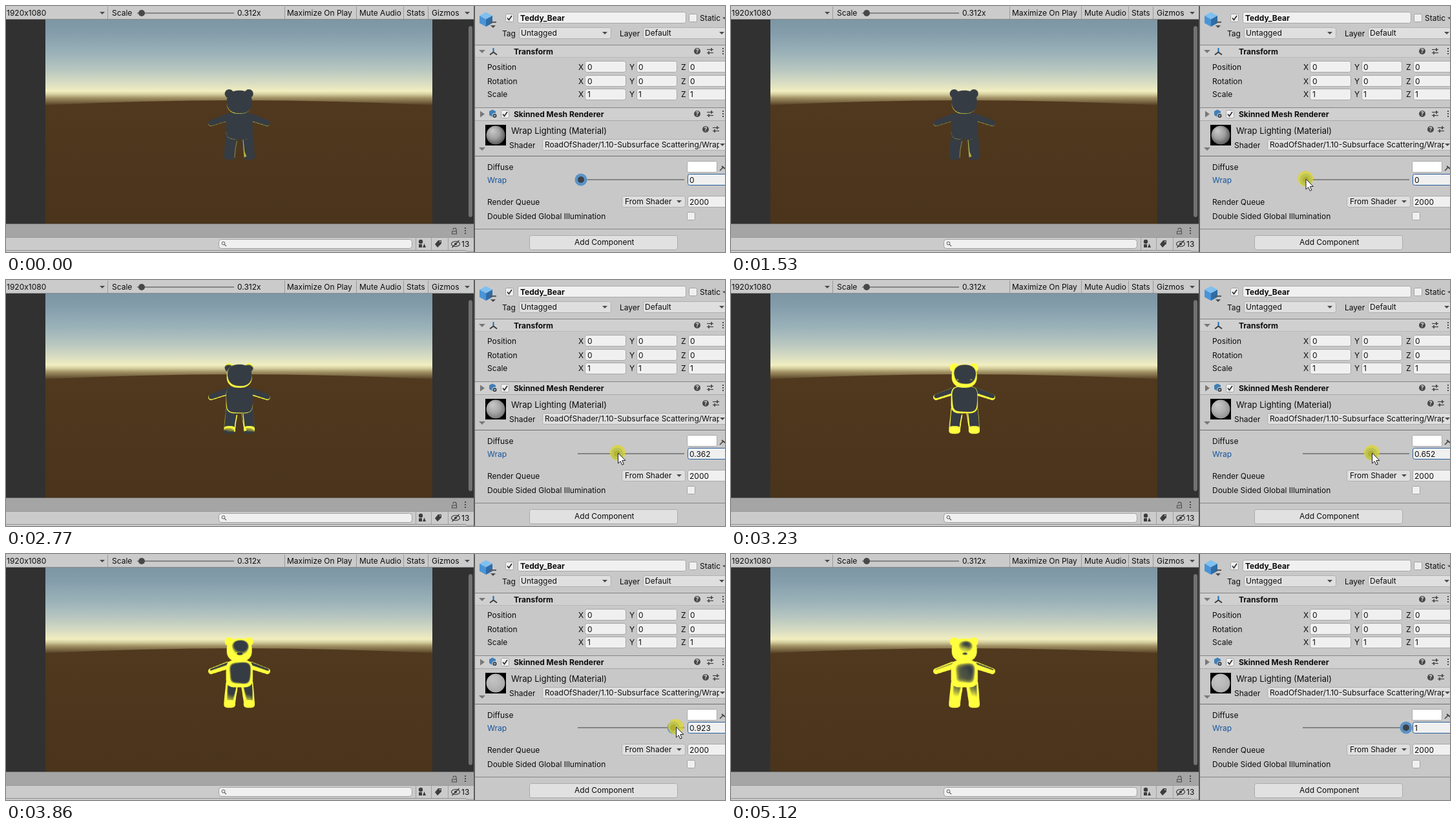
An HTML page with a canvas that plays this animation: 1113 by 381 pixels, repeating every 5.9 s.

```html
<!DOCTYPE html>
<html lang="en">
<head>
<meta charset="utf-8">
<title>Wrap Lighting</title>
<style>
html, body { margin: 0; width: 100%; height: 100%; overflow: hidden; background: #c8c8c8; }
#stage { position: relative; width: 1113px; height: 381px; overflow: hidden; }
canvas { position: absolute; left: 0; top: 0; }
span {
  position: absolute; font: 12px/16px Inter, Roboto, sans-serif; color: #0c0c0c;
  white-space: pre; overflow: hidden;
}
.bold { font-weight: 700; }
.big { font-size: 13px; }
.blue { color: #14549c; }
</style>
</head>
<body>
<div id="stage"><canvas id="back" width="1113" height="381"></canvas></div>
<script>
const LOOP = 5900, START = 430, STEP = 77.75;
const stage = document.getElementById('stage');
const back = document.getElementById('back').getContext('2d');
let g = back;

// ---------- drawing helpers ----------
function rect(x, y, w, h, color) {
  g.fillStyle = color;
  g.fillRect(x, y, w, h);
}
function box(x, y, w, h, fill, border, r = 3) {
  g.beginPath();
  g.roundRect(x + .5, y + .5, w - 1, h - 1, r);
  g.fillStyle = fill;
  g.fill();
  g.strokeStyle = border;
  g.lineWidth = 1;
  g.stroke();
}
function disc(x, y, r, color) {
  g.beginPath();
  g.arc(x, y, r, 0, 7);
  g.fillStyle = color;
  g.fill();
}
function shape(points, fill) {
  g.beginPath();
  points.forEach(([x, y]) => g.lineTo(x, y));
  g.closePath();
  g.fillStyle = fill;
  g.fill();
}
function line(points, color = '#404040', width = 1.2) {
  g.beginPath();
  points.forEach(([x, y]) => g.lineTo(x, y));
  g.strokeStyle = color;
  g.lineWidth = width;
  g.stroke();
}
const down = (x, y, s = 4, c = '#4a4a4a') => shape([[x - s, y - s / 2], [x + s, y - s / 2], [x, y + s / 2]], c);
const field = (x, y, w, h = 18) => box(x, y, w, h, '#f0f0f0', '#a8a8a8');
const dropdown = (x, y, w, arrow) => {
  box(x, y, w, 18, '#dfdfdf', '#b0b0b0');
  down(arrow, y + 9);
};
function check(x, y, on) {
  box(x, y, 13, 13, '#f0f0f0', '#a3a3a3', 2);
  if (on) line([[x + 3, y + 6.5], [x + 5.5, y + 9.5], [x + 10, y + 3]], '#303030', 1.7);
}
function label(text, x, y, cls = '', width) {
  const el = document.createElement('span');
  el.textContent = text;
  el.className = cls;
  el.style.left = x + 'px';
  el.style.top = y - 8 + 'px';
  if (width) el.style.width = width + 'px';
  stage.append(el);
  return el;
}
function dots(x, y) {
  for (const d of [-4, 0, 4]) rect(x - 1, y + d - 1, 2, 2, '#4a4a4a');
}
function tools(x, y, gap) {
  disc(x, y, 5, '#484848');
  g.fillStyle = '#e0e0e0';
  g.font = 'bold 9px Inter, sans-serif';
  g.textAlign = 'center';
  g.fillText('?', x, y + 3.3);
  const s = x + gap;
  line([[s - 5, y - 2.5], [s + 5, y - 2.5]]);
  line([[s - 5, y + 2.5], [s + 5, y + 2.5]]);
  line([[s + 2, y - 5], [s + 2, y]], '#404040', 1.6);
  line([[s - 2, y], [s - 2, y + 5]], '#404040', 1.6);
}

// ---------- static window ----------
function drawGameView() {
  rect(0, 0, 725, 21, '#cbcbcb');
  rect(0, 20, 725, 1, '#8c8c8c');
  rect(0, 21, 725, 316, '#313131');

  const sky = g.createLinearGradient(0, 21, 0, 153);
  [[0, '#7d96a4'], [.15, '#839dab'], [.4, '#9bb2b9'], [.6, '#bac8c0'], [.75, '#dadec2'],
   [.84, '#f2eec0'], [.875, '#d6cf9f'], [.92, '#a29265'], [1, '#5a4528']]
    .forEach(([p, c]) => sky.addColorStop(p, c));
  rect(61, 21, 599, 133, sky);

  const soil = g.createLinearGradient(0, 146, 0, 337);
  soil.addColorStop(0, '#51391f');
  soil.addColorStop(.3, '#4e371d');
  soil.addColorStop(1, '#4a341b');
  g.beginPath();
  g.moveTo(61, 153.5);
  g.quadraticCurveTo(361, 138.5, 660, 153.5);
  g.lineTo(660, 337);
  g.lineTo(61, 337);
  g.fillStyle = soil;
  g.fill();

  box(716, 31, 6, 296, '#717171', '#717171', 3);
  for (const x of [157, 431, 542, 615, 653]) rect(x, 1, 1, 19, '#9a9a9a');
  down(149, 11);
  down(714, 11);
  rect(203, 10, 150, 2, '#858585');
  disc(210, 11, 5, '#484848');
}

function drawBottomBar() {
  rect(0, 337, 725, 21, '#a5a5a5');
  rect(0, 337, 725, 1, '#6f6f6f');
  rect(0, 358, 725, 23, '#cbcbcb');
  rect(0, 358, 725, 1, '#999');
  rect(0, 378, 712, 1, '#8f8f8f');
  rect(712, 379, 13, 2, '#b4b4b4');
  box(329, 361, 300, 15, '#f0f0f0', '#a0a0a0', 4);
  g.beginPath();
  g.arc(336.5, 367.5, 2.4, 0, 7);
  g.strokeStyle = '#555';
  g.lineWidth = 1;
  g.stroke();
  line([[338.3, 369.3], [341, 372]], '#555', 1.1);
  for (const x of [634, 658, 684]) rect(x, 359, 1, 19, '#a0a0a0');

  // lock
  rect(690, 348.5, 8, 5, '#474747');
  rect(691, 349.5, 6, 3, '#a5a5a5');
  g.beginPath();
  g.arc(694.5, 346.5, 2.5, Math.PI, 0);
  g.lineTo(697, 348.5);
  g.strokeStyle = '#474747';
  g.lineWidth = 1.1;
  g.stroke();
  dots(711, 348);

  // filter icons
  disc(642, 365, 3.2, '#3c3c3c');
  rect(639, 369, 5, 5, '#3c3c3c');
  shape([[645, 374], [647.5, 368], [650, 374]], '#3c3c3c');
  shape([[664, 369], [669, 363], [674, 363], [674, 368], [668, 374]], '#3c3c3c');
  disc(672, 365, 1, '#cbcbcb');
  g.beginPath();
  g.ellipse(696, 368.5, 6.5, 4, 0, 0, 7);
  g.strokeStyle = '#3c3c3c';
  g.lineWidth = 1.2;
  g.stroke();
  disc(696, 368.5, 2, '#3c3c3c');
  line([[690.5, 374], [701.5, 363]], '#3c3c3c', 1.4);
}

function drawInspector() {
  rect(724, 0, 2, 381, '#5c5c5c');
  rect(726, 0, 387, 381, '#c8c8c8');
  rect(726, 61, 387, 19, '#d0d0d0');
  rect(726, 158, 387, 19, '#d0d0d0');
  for (const [y, c] of [[60, '#848484'], [79, '#bababa'], [157, '#848484'], [177, '#a8a8a8'],
                        [232, '#6e6e6e'], [345, '#848484']]) rect(726, y, 387, 1, c);

  // cube
  shape([[733, 15], [743, 9.5], [753, 15], [743, 20.5]], '#7fc0f0');
  shape([[733, 15], [743, 20.5], [743, 32], [733, 26.5]], '#4a94d6');
  shape([[753, 15], [743, 20.5], [743, 32], [753, 26.5]], '#2f6da8');
  shape([[749, 24], [759, 24], [759, 26], [749, 26]], '#5a5a5a');
  down(754, 32, 4);

  check(773, 12, true);
  field(792, 9, 261);
  check(1057, 12, false);
  down(1112, 19, 3);
  dropdown(794, 33, 143, 927);
  dropdown(986, 33, 140, 1108);

  // transform section
  down(737, 70.5, 5, '#777');
  line([[754.5, 72], [754.5, 65]], '#1f6fb5', 2);
  line([[754.5, 71.5], [749, 75.5]], '#3a3a3a', 2);
  line([[754.5, 71.5], [760, 75.5]], '#3a3a3a', 2);
  tools(1070, 70, 20);
  dots(1110, 70);
  for (const y of [85, 107, 128]) {
    field(896, y, 64);
    field(976, y, 63);
    field(1056, y, 70);
  }

  // renderer section
  shape([[734, 162.5], [741, 167.5], [734, 172.5]], '#777');
  shape([[748, 163], [753, 160.5], [758, 163], [758, 169], [753, 172], [748, 169]], '#3f7fb8');
  disc(756.5, 170, 4.2, '#e4e4e4');
  disc(756.5, 170, 3.2, '#4a4a4a');
  disc(756.5, 170, 1.2, '#8ec7ef');
  check(766, 161, true);
  tools(1070, 167, 20);
  dots(1110, 167);

  // material section
  tools(1083, 191, 16);
  down(737, 221.5, 5, '#777');
  dropdown(830, 206, 296, 1109);
  box(1054, 240, 47, 18, '#fff', '#a8a8a8', 2);
  line([[1105, 255], [1110, 250]], '#444', 1.6);
  line([[1108, 248], [1113, 252]], '#444', 2);
  dropdown(953, 294, 99, 1042);
  field(1055, 294, 70);
  check(1054, 319, false);
  box(810, 355, 230, 23, '#e1e1e1', '#ababab');
}

function addLabels() {
  label('1920x1080', 1, 11);
  label('Scale', 164, 11);
  label('0.312x', 358, 11, '', 36);
  label('Maximize On Play', 435, 11);
  label('Mute Audio', 547, 11);
  label('Stats', 620, 11);
  label('Gizmos', 659, 11);
  label('13', 705, 369);
  label('Teddy_Bear', 796, 19, 'bold');
  label('Static', 1074, 19);
  label('Tag', 768, 43);
  label('Untagged', 797, 42);
  label('Layer', 950, 43);
  label('Default', 989, 42);
  label('Transform', 786, 71, 'bold');
  [['Position', 95, '0'], ['Rotation', 117, '0'], ['Scale', 137, '1']].forEach(([name, y, value]) => {
    label(name, 745, y);
    [['X', 886, 900], ['Y', 965, 979], ['Z', 1045, 1059]].forEach(([axis, x, vx]) => {
      label(axis, x, y);
      label(value, vx, y);
    });
  });
  label('Skinned Mesh Renderer', 786, 168, 'bold');
  label('Wrap Lighting (Material)', 782, 193, 'big');
  label('Shader', 779, 216);
  label('RoadOfShader/1.10-Subsurface Scattering/Wrap Lighting', 834, 215, '', 270);
  label('Diffuse', 745, 250);
  label('Wrap', 745, 270, 'blue');
  label('Render Queue', 745, 304);
  label('From Shader', 958, 303);
  label('2000', 1058, 304);
  label('Double Sided Global Illumination', 745, 326);
  label('Add Component', 880, 366);
}

// ---------- bear: rounded parts lit from behind and below ----------
const BX = 309, BY = 125, BW = 104, BH = 117, RES = 3;
const TO_EYE = [.12, -.36, .925]; // opposite of the light direction

// rounded block: centre, radii, squareness n, bulge p, normal scale k, tilt
function blob(cx, cy, rx, ry, n, p, k, tilt) {
  return (x, y) => {
    const u = (x - cx) / rx, v = (y - cy) / ry;
    const m = (Math.abs(u) ** n + Math.abs(v) ** n) ** (1 / n);
    return m <= 1 && { u, v, m, p, k, tilt };
  };
}
// tapered limb from a to b; tilt runs from t0 to t1
function limb(ax, ay, ar, bx, by, br, p, t0, t1) {
  const dx = bx - ax, dy = by - ay, len = dx * dx + dy * dy;
  return (x, y) => {
    const h = Math.max(0, Math.min(1, ((x - ax) * dx + (y - ay) * dy) / len));
    const r = ar + (br - ar) * h;
    const u = (x - ax - dx * h) / r, v = (y - ay - dy * h) / r, m = Math.hypot(u, v);
    return m <= 1 && { u, v, m, p, k: 1, tilt: t0 + (t1 - t0) * h };
  };
}
// front parts first
const parts = [
  blob(361.3, 154.5, 6, 2.8, 2, 1.5, .7, -.4),
  blob(351, 154, 1.6, 1.3, 2, 1, .4, .5),
  blob(372, 154, 1.6, 1.3, 2, 1, .4, .5),
  blob(361.2, 149, 19.6, 18, 2.4, 1.6, 1, 0),
  blob(345.5, 136, 6.8, 6.8, 2, 2, -.35, 1),
  blob(376, 136, 6.8, 6.8, 2, 2, -.35, 1),
  blob(346, 232, 8.8, 6, 3, 2, -.3, 1.15),
  blob(376.5, 232, 8.6, 6, 3, 2, -.3, 1.15),
  blob(361.3, 185.5, 20.8, 21, 4, 2.5, 1, -.3),
  limb(350, 200, 9.5, 346, 229.5, 8.6, 2.5, -.25, .2),
  limb(373, 200, 9.5, 376.5, 229.5, 8.4, 2.5, -.25, .2),
  limb(343, 172.5, 5.6, 317.5, 181.5, 4.5, 1.2, .2, .25),
  limb(379, 172.5, 5.6, 404.5, 181.5, 4.5, 1.2, .2, .25)
];

const bear = document.createElement('canvas');
bear.width = BW * RES;
bear.height = BH * RES;
const bearCtx = bear.getContext('2d');
const bearPixels = bearCtx.createImageData(bear.width, bear.height);
const facing = new Float32Array(bear.width * bear.height).fill(9); // 9 marks empty

function facingOf({ u, v, m, p, k, tilt }) {
  const len = Math.hypot(u, v) || 1, s = m ** p * k;
  const nx = u / len * s, ny = v / len * s + tilt, nz = Math.sqrt(Math.max(0, 1 - s * s));
  return (nx * TO_EYE[0] + ny * TO_EYE[1] + nz * TO_EYE[2]) / Math.hypot(nx, ny, nz);
}
for (let i = 0; i < facing.length; i++) {
  const x = BX + (i % bear.width + .5) / RES, y = BY + (Math.floor(i / bear.width) + .5) / RES;
  for (const part of parts) {
    const hit = part(x, y);
    if (hit) {
      facing[i] = facingOf(hit);
      break;
    }
  }
}
function shadeBear(wrap) {
  const d = bearPixels.data;
  for (let i = 0; i < facing.length; i++) {
    if (facing[i] === 9) continue;
    const lit = Math.max(0, Math.min(1, (wrap - facing[i]) / (1 + wrap) / .05));
    d[i * 4] = 54 + 201 * lit;
    d[i * 4 + 1] = 60 + 195 * lit;
    d[i * 4 + 2] = 67 - 5 * lit;
    d[i * 4 + 3] = 255;
  }
  bearCtx.putImageData(bearPixels, 0, 0);
}
function drawBear(wrap) {
  shadeBear(wrap);
  g.imageSmoothingQuality = 'high';
  g.drawImage(bear, BX, BY, BW, BH);
  // inner sides of the legs
  const glow = `rgba(255,255,70,${Math.min(1, .6 + wrap * 3)})`;
  line([[357.5, 209], [355, 222], [354, 235]], glow, .7 + Math.min(.8, wrap * 4));
  shape([[366.5, 207], [367.5, 207], [369.5, 226], [372.5, 233], [368.5, 234.5]], glow);
}

function drawPreview(wrap) {
  const grey = (a, b) => {
    const c = Math.round(a + (b - a) * wrap);
    return `rgb(${c},${c},${c})`;
  };
  rect(742, 184, 32, 32, '#000');
  const ball = g.createRadialGradient(753, 193, 2, 757, 199, 17);
  ball.addColorStop(0, grey(196, 194));
  ball.addColorStop(.5, grey(160, 186));
  ball.addColorStop(1, grey(82, 172));
  disc(758, 200, 14.5, ball);
}

// ---------- motion ----------
const still = document.createElement('canvas');
still.width = 1113;
still.height = 381;

function track(keys, k) {
  let i = 1;
  while (i < keys.length - 1 && k > keys[i][0]) i++;
  const [k0, a] = keys[i - 1], [k1, b] = keys[i];
  return a + (b - a) * Math.max(0, Math.min(1, (k - k0) / (k1 - k0)));
}
const wrapKeys = [[14, 0], [23, .123], [30, .362], [36, .652], [44, .923], [47, 1]];
const dragKeys = [[14, 890], [23, 910], [30, 947.5], [36, 992.5], [44, 1037.5], [52, 1090]];
const leaveKeys = [[56, 268], [57, 284], [58, 315], [59, 355], [60, 390]];

function pointer(k) {
  if (k < 0 || k >= 60) return null;
  if (k <= 7) {
    const e = 1 - (1 - k / 7) ** 1.7;
    return [1045 - 153 * e, 374 - 100 * e];
  }
  if (k < 14) return [k < 9 ? 891 : 890, k < 9 ? 271 : 268];
  return [track(dragKeys, k) + (k > 56 ? 1 : 0), track(leaveKeys, k)];
}
function drawArrow(x, y) {
  const outline = [[0, 0], [0, 16], [3.7, 12.7], [6.3, 18.3], [8.8, 17.2], [6.3, 11.6], [11.3, 11.4]]
    .map(([a, b]) => [x + a, y + b]);
  shape(outline, '#fff');
  g.strokeStyle = '#1c1c1c';
  g.lineWidth = 1;
  g.lineJoin = 'round';
  g.stroke();
}

drawGameView();
drawBottomBar();
drawInspector();
still.getContext('2d').drawImage(back.canvas, 0, 0);
addLabels();
const valueText = label('0', 1058, 270);

const topCanvas = document.createElement('canvas');
topCanvas.width = 1113;
topCanvas.height = 381;
stage.append(topCanvas);
const front = topCanvas.getContext('2d');

function render(k) {
  const wrap = track(wrapKeys, k);
  g = back;
  g.drawImage(still, 0, 0);
  drawBear(wrap);
  drawPreview(wrap);
  rect(885, 268, 165, 2, '#848484');
  const knob = 890 + 155 * wrap;
  disc(knob, 269, 9.5, '#5b93c6');
  disc(knob, 269, 5, '#3e4247');
  box(1055, 260, 70, 18, '#f0f0f0', '#2b5f9b');
  valueText.textContent = String(+wrap.toFixed(3));

  g = front;
  g.clearRect(0, 0, 1113, 381);
  const tip = pointer(k);
  if (!tip) return;
  if (k >= 12 && k < 56) disc(tip[0] - .7, tip[1] - .5, 12, 'rgba(222,214,40,.74)');
  drawArrow(...tip);
}

let shown = null;
function tick() {
  const t = performance.now() % LOOP;
  const k = Math.max(-1, Math.min(60, Math.floor((t - START) / STEP + .01)));
  if (k !== shown) render(shown = k);
  requestAnimationFrame(tick);
}
tick();
</script>
</body>
</html>
```
